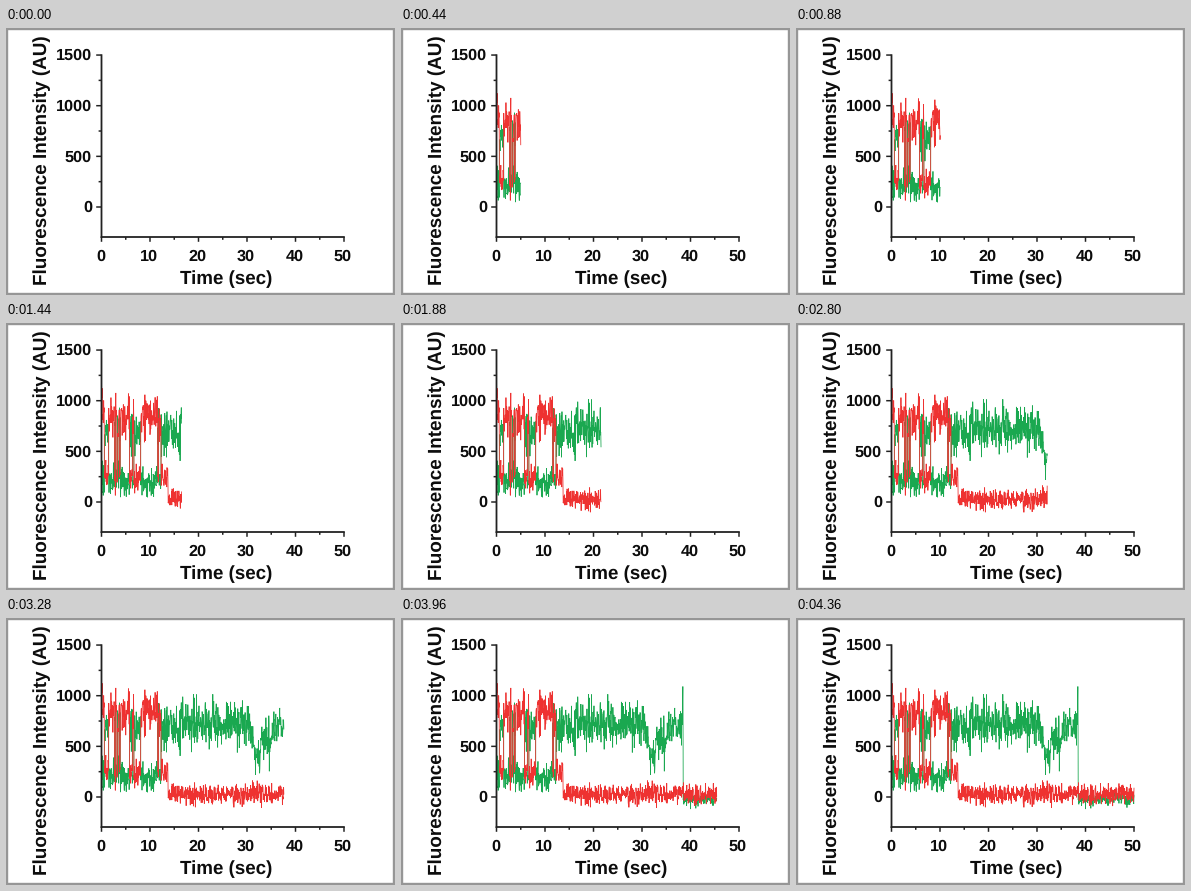
A matplotlib script for the animation above (4400 ms loop, 389 px wide and 267 px high).

```python
import numpy as np
import matplotlib.pyplot as plt
from matplotlib.animation import FuncAnimation
from matplotlib.patches import Rectangle

W, H, DPI = 389, 267, 64
FRAMES, STEP = 110, 40
PT = 72 / DPI
INK, GREEN, RED, BORDER = "#222222", "#1aa850", "#ee3231", "#969696"

plt.rcParams.update({"font.family": "Liberation Sans", "font.weight": "bold",
                     "text.hinting": "no_hinting", "path.simplify": False})

fig = plt.figure(figsize=(W / DPI, H / DPI), dpi=DPI, facecolor="white")
ax = fig.add_axes([0, 0, 1, 1])
ax.set(xlim=(0, W), ylim=(H, 0))
ax.axis("off")


def px(sec):
    return 95.5 + 4.85 * sec


def py(au):
    return 179 - 0.1013 * au


def stroke(x, y, color=INK, width=1.8, z=4):
    return ax.plot(x, y, color=color, lw=width * PT, zorder=z, snap=False,
                   solid_capstyle="butt", solid_joinstyle="bevel")[0]


def label(x, y, text, size, **kw):
    ax.text(x, y, text, size=size * PT, color="#0c0c0c", va="baseline", **kw)


def bump(center, width):
    return np.exp(-((t - center) / width) ** 2)


def noise(sd):
    return sd * np.clip(rng.normal(size=t.size), -2.9, 2.9)


# Border
ax.add_patch(Rectangle((1, 1), W - 2, H - 2, fill=False, ec=BORDER, lw=2.4 * PT))

# Axes
stroke([95.5, 95.5], [26.3, 209.8])
stroke([94.7, 338.8], [209, 209])
for sec in range(0, 51, 5):
    major = sec % 10 == 0
    stroke([px(sec)] * 2, [209, 213.8 if major else 211.8], width=1.5)
    if major:
        label(px(sec) - 1, 233, str(sec), 16.3, ha="center")
for au in range(0, 1501, 250):
    major = au % 500 == 0
    stroke([90.2 if major else 92.6, 95.5], [py(au)] * 2, width=1.5)
    if major:
        label(86, py(au) + 5.2, str(au), 16.3, ha="right")
label(220.5, 255.6, "Time (sec)", 18.7, ha="center")
label(41.5, 257, "Fluorescence Intensity (AU)", 18.9, ha="left",
      rotation=90, rotation_mode="anchor")

# Two anti-correlated traces; each dye bleaches in turn
BLEACH_RED, BLEACH_GREEN = 13.75, 38.45
rng = np.random.default_rng(12)
t = np.arange(0, 50.01, 0.05)

flips = [0.6, 1.5, 2.7, 2.9, 3.2, 3.4, 3.7, 3.9,
         5.8, 6.4, 6.7, 8.1, 11.6, 11.8, 12.3]
high = np.searchsorted(flips, t, side="right") % 2 == 0
lit = t < BLEACH_RED

bright = 840 + 130 * bump(0, 0.5) + 120 * bump(6, 0.3) + 200 * bump(13.1, 0.5)
red = np.where(high, bright + noise(105), 235 + noise(62))
red = np.where(lit, red, 30 + noise(52))

steady = 710 - 290 * bump(32.2, 1.1) - 170 * bump(34.7, 0.9)
green = np.where(high & lit, 190 + noise(75), steady + noise(105))
green[t > BLEACH_GREEN - 0.08] = 1090
green = np.where(t > BLEACH_GREEN, -12 + noise(38), green)

green_line = stroke([], [], GREEN, 0.8, 2)
red_line = stroke([], [], RED, 0.8, 3)


def draw(i):
    now = t[-1] * i / (FRAMES - 1)
    n = np.searchsorted(t, now, side="right") if i else 0
    green_line.set_data(px(t[:n]), py(green[:n]))
    red_line.set_data(px(t[:n]), py(red[:n]))
    return green_line, red_line


anim = FuncAnimation(fig, draw, frames=FRAMES, interval=STEP, repeat=True,
                     repeat_delay=0, blit=False)
plt.show()
```
